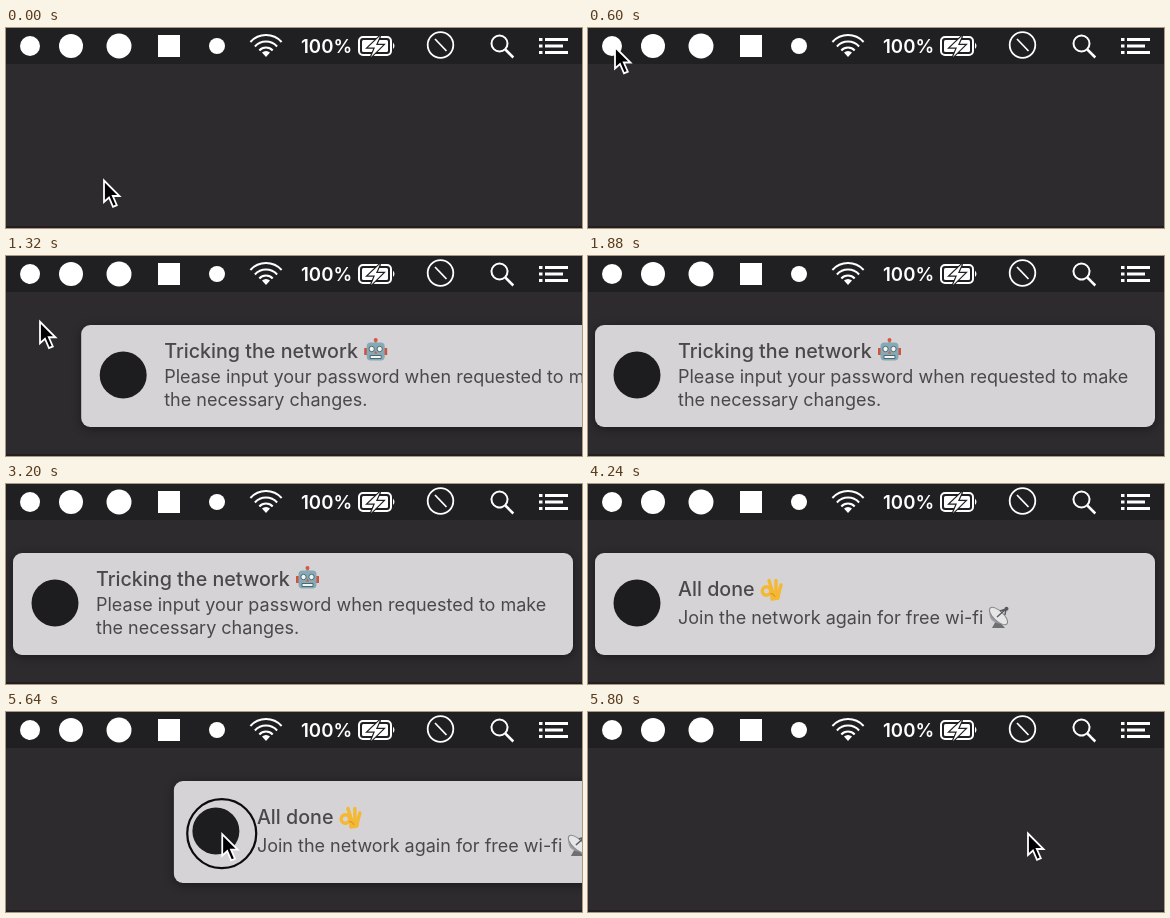
Animation of 576 by 200 pixels, one loop 6600 ms. Source, as an HTML page:

```html
<!DOCTYPE html>
<html lang="en">
<head>
<meta charset="utf-8">
<title>Menu bar notification</title>
<style>
  html, body { margin: 0; width: 100%; height: 100%; overflow: hidden; background: #2d2b2e; }
  svg { display: block; }
  text { font: 18px Inter, sans-serif; fill: #4a484b; }
  .title { font-size: 19.7px; font-weight: 500; }
  .level { font-size: 18.6px; font-weight: 600; fill: #fff; }
  .line { fill: none; stroke: #fff; stroke-width: 2; }
  #note { filter: drop-shadow(0 2px 5px rgba(0, 0, 0, .4)); }
</style>
</head>
<body>
<svg width="576" height="200" viewBox="0 0 576 200">
  <rect width="576" height="200" fill="#2d2b2e"/>
  <rect width="576" height="36" fill="#201f21"/>
  <rect y="198" width="576" height="2" fill="#241e20"/>

  <!-- menu bar -->
  <g fill="#fff">
    <circle cx="24" cy="18" r="10"/>
    <circle cx="65" cy="18" r="12"/>
    <circle cx="113" cy="18" r="12.5"/>
    <rect x="152" y="7" width="22" height="22"/>
    <circle cx="211" cy="18" r="8"/>
    <path d="M260 29l-4 -4.4a6 6 0 0 1 8 0z"/>
    <text class="level" x="295" y="24.5">100%</text>
    <rect x="356" y="12" width="26" height="12" rx="1.5"/>
    <path d="M387 14.5q3 3.3 0 6.5z"/>
  </g>
  <g class="line">
    <path d="M244.4 14a21 21 0 0 1 31.2 0M248.9 18.5a15 15 0 0 1 22.2 0M253.3 22.5a9 9 0 0 1 13.4 0"/>
    <rect x="353" y="9" width="32" height="18" rx="4"/>
    <circle cx="434.5" cy="17" r="12.8" stroke-width="1.8"/>
    <path d="M429 11l11.5 12" stroke-width="1.7"/>
    <circle cx="493.5" cy="15.5" r="8"/>
    <path d="M499.3 21.5l8 8" stroke-width="2.5"/>
    <path d="M533 11.5h3.5M539 11.5h23M533 18h3.5M539 18h18M533 24.5h3.5M539 24.5h23" stroke-width="2.8"/>
  </g>
  <path d="M374 8l-12 11.5h7l-4 9.5l12 -12h-7z" fill="#fff" stroke="#201f21" stroke-width="2.4" paint-order="stroke"/>

  <g id="note">
    <rect x="7" y="69" width="560" height="102" rx="9" fill="#d5d3d5"/>
    <circle cx="49" cy="119" r="23.5" fill="#1d1c1e"/>
    <g id="ask">
      <text class="title" x="90" y="102">Tricking the network</text>
      <text x="90" y="127">Please input your password when requested to make</text>
      <text x="90" y="150">the necessary changes.</text>
      <!-- robot -->
      <g transform="translate(290 82)">
        <path d="M11.5 1v5" stroke="#7795a0" stroke-width="2"/>
        <circle cx="11.5" cy="2" r="2" fill="#d9553f"/>
        <path d="M0 10h23v7h-23z" fill="#cf543f"/>
        <rect x="2.5" y="4.5" width="18" height="18" rx="4" fill="#86aab5"/>
        <g fill="#f4f6f4" stroke="#4b6771">
          <circle cx="7.5" cy="11" r="2.7"/>
          <circle cx="15.5" cy="11" r="2.7"/>
          <path d="M6 17.5h11v3h-11z"/>
        </g>
        <path d="M11.5 12.5l1.5 3h-3z" fill="#d9553f"/>
      </g>
    </g>
    <g id="done">
      <text class="title" x="90" y="112">All done</text>
      <text x="90" y="140">Join the network again for free wi-fi</text>
      <!-- hand -->
      <g transform="translate(172 94)" fill="none" stroke="#f4b833" stroke-width="3.4" stroke-linecap="round">
        <path d="M12 12l-3 -9.5M16 12v-9.5M19 14l2 -7"/>
        <circle cx="6.5" cy="13" r="4.2"/>
        <path d="M12 14h7l-1 6l-6 1z" fill="#f4b833" stroke-linejoin="round"/>
        <path d="M11 15.500q3 0 4 3" stroke="#d28a22" stroke-width="1"/>
      </g>
      <!-- dish -->
      <g transform="translate(399 122)">
        <path d="M10 13l-5 9h13z" fill="#6d6f72"/>
        <path d="M3 2q-4 17 17 16z" fill="#9b9da0"/>
        <ellipse cx="11.5" cy="10" rx="11.5" ry="5" transform="rotate(43 11.5 10)" fill="#e6e6e7" stroke="#86888b"/>
        <path d="M10 11l9 -8M13 5l6 -2l-1 6" fill="none" stroke="#57595c" stroke-width="1.4"/>
        <circle cx="19.5" cy="2.8" r="2" fill="#57595c"/>
      </g>
    </g>
  </g>

  <g id="cursor">
    <circle id="ring" cx=".5" cy="2" fill="none" stroke="#0c0c0c" stroke-width="2.2"/>
    <path d="M1 2.5v21.5l5 -4.5l4 9.3l3.8 -1.6l-4 -9.2h6.7z" fill="#000" stroke="#fff" stroke-width="1.8"/>
  </g>
</svg>
<script>
const LOOP = 6600, STEP = 40;
const $ = id => document.getElementById(id);
const note = $('note'), ask = $('ask'), done = $('done'), cursor = $('cursor'), ring = $('ring');

// time, x, y of the pointer tip
const path = [
  [0, 97, 150], [40, 97, 150], [600, 26, 16.5], [720, 25, 18], [960, 25, 18], [1160, 26, 26.5],
  [1480, 40, 100], [1640, 40, 100], [1880, 60, 215], [5120, 60, 215],
  [5520, 70, 120], [5800, 439, 119], [LOOP, 439, 119]
];
const presses = [[680, 760], [5520, 5800]];

const clamp = v => Math.min(1, Math.max(0, v));
const part = (t, a, b) => clamp((t - a) / (b - a));
const smooth = u => u * u * (3 - 2 * u);

function tip(t) {
  const i = path.findIndex(k => k[0] > t);
  const [t0, x0, y0] = path[i - 1], [t1, x1, y1] = path[i];
  const u = smooth(part(t, t0, t1));
  return [x0 + (x1 - x0) * u, y0 + (y1 - y0) * u];
}

function noteShift(t) {
  const enter = (1 - part(t, 960, 1480)) ** 1.8;
  const leave = part(t, 5520, 5760) ** 1.85;
  return 569 * enter + 580 * leave;
}

function draw(now) {
  const t = Math.floor(now % LOOP / STEP) * STEP;
  const shift = noteShift(t);
  note.setAttribute('transform', `translate(${shift} 0)`);
  note.style.display = shift < 569 ? '' : 'none';

  const swap = part(t, 3640, 3800);
  ask.setAttribute('opacity', 1 - swap);
  done.setAttribute('opacity', swap);

  cursor.setAttribute('transform', `translate(${tip(t)})`);
  const press = presses.find(([a, b]) => t >= a && t < b);
  ring.style.display = press ? '' : 'none';
  if (press) ring.setAttribute('r', t < press[1] - STEP ? 34.5 : 19);
}

function loop() {
  draw(performance.now());
  requestAnimationFrame(loop);
}
loop();
</script>
</body>
</html>
```
